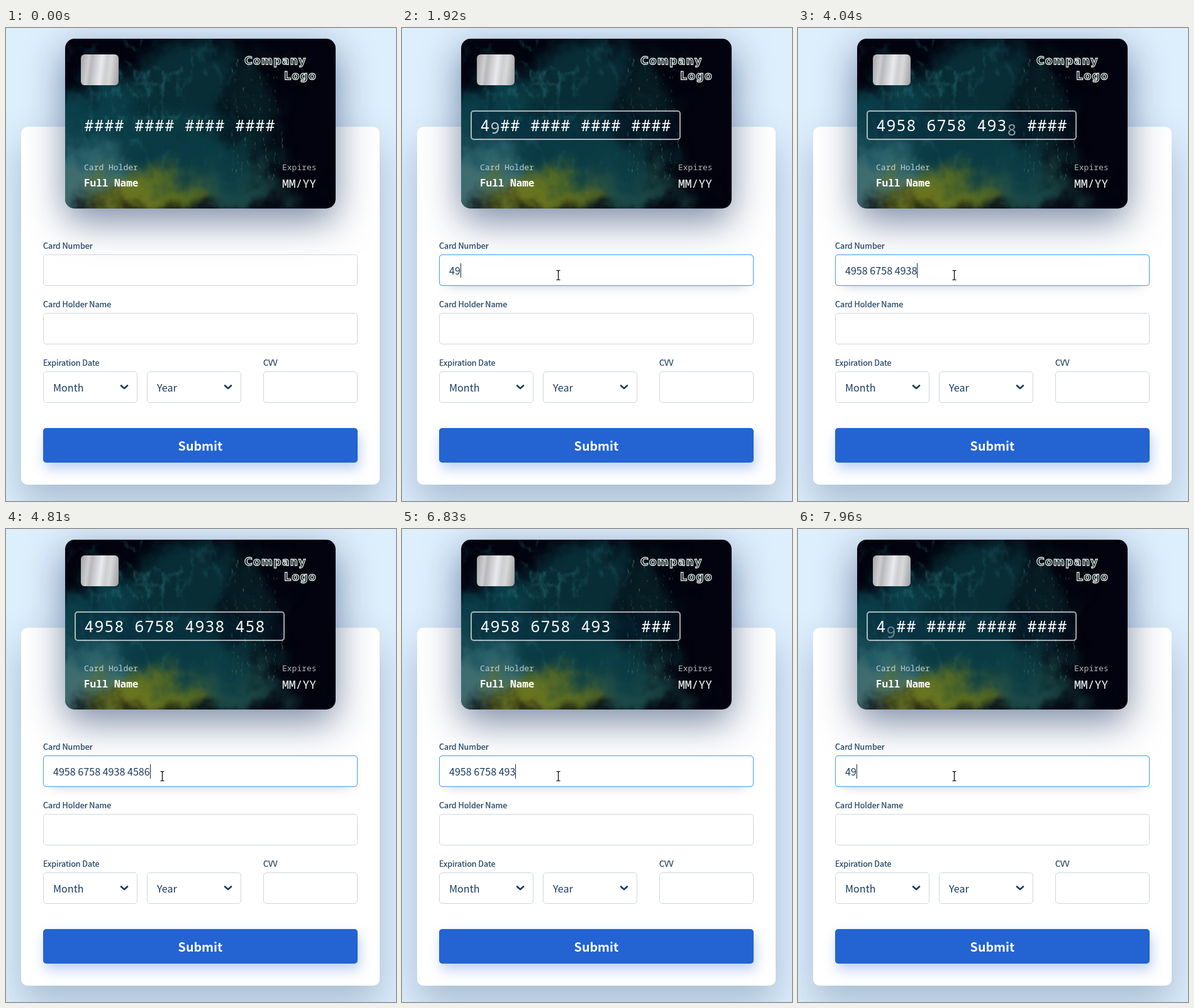
Animation of 620x752 px, one loop 8000 ms. Source, as an HTML page:

```html
<!DOCTYPE html>
<html lang="en">
<head>
<meta charset="utf-8">
<title>Card form</title>
<style>
  html, body { margin: 0; width: 100%; height: 100%; overflow: hidden; background: #ddeefc; }
  div, svg { position: absolute; box-sizing: border-box; }
  .form { left: 24px; top: 157px; width: 570px; height: 569px; border-radius: 10px; background: #fff;
    box-shadow: 0 30px 60px rgba(90, 116, 148, .4); }
  .card { left: 94px; top: 17px; width: 430px; height: 270px; border-radius: 15px; overflow: hidden;
    background: #02030e; will-change: transform; }
  .card-shadow { left: 94px; top: 17px; width: 430px; height: 270px; border-radius: 15px;
    box-shadow: 0 20px 60px rgba(14, 42, 90, .55); }
  .chip { left: 25px; top: 25px; width: 60px; height: 49px; border-radius: 6px;
    background: linear-gradient(97deg, #a3a3a5, #cfcfd1 20%, #b8b8ba 28%, #e9eaee 52%, #cdced0 65%, #d8d8d9 76%, #9b9c9d); }
  .field { width: 500px; height: 50px; left: 59px; border: 1px solid #ced6e0; border-radius: 5px; }
  .small { width: 150px; top: 546px; }
  .number { top: 360px; }
  #glow { border: 0; box-shadow: 0 10px 20px -13px rgba(32, 56, 117, .35); }
  #active { border-color: #3d9cff; }
  .submit { left: 59px; top: 636px; width: 500px; height: 55px; border-radius: 5px; background: #2364d2;
    box-shadow: 3px 10px 20px rgba(35, 100, 210, .3); }
  #frame { border: 2px solid rgba(255, 255, 255, .65); border-radius: 5px; background: rgba(8, 20, 47, .22); }
  text { font-family: "Noto Sans CJK JP", "Noto Sans CJK SC", "Noto Sans CJK", "Open Sans", sans-serif; fill: #1a3b5d; white-space: pre; }
  .label { font-size: 12.6px; font-weight: 500; stroke: #1a3b5d; stroke-width: .2px; }
  .value { font-size: 16.1px; font-weight: 300; }
  .action { font-size: 19.7px; font-weight: 700; fill: #fff; text-anchor: middle; }
  .mono, .digits text { font-family: "Noto Sans Mono", "DejaVu Sans Mono", monospace; fill: #fff; }
  .caption { font-size: 13px; opacity: .7; font-weight: 500; }
  .digits text { font-size: 24.8px; font-weight: 500; text-anchor: middle; }
  .logo { font: 700 17.5px "DejaVu Sans", sans-serif; letter-spacing: 1px; fill: #0b191e; stroke: #e3ece8; stroke-width: 1.3px; }
</style>
</head>
<body>
<div class="form"></div>
<div class="card-shadow"></div>
<div class="card">
  <svg width="430" height="270" viewBox="94 17 430 270">
    <defs>
      <filter id="smoke" x="-20%" y="-20%" width="140%" height="140%" color-interpolation-filters="sRGB">
        <feGaussianBlur stdDeviation="16" result="soft"/>
        <feTurbulence type="fractalNoise" baseFrequency=".018" numOctaves="4" seed="8"/>
        <feDisplacementMap in="soft" scale="85" xChannelSelector="R" yChannelSelector="G"/>
      </filter>
      <filter id="strands" x="-20%" y="-20%" width="140%" height="140%" color-interpolation-filters="sRGB">
        <feTurbulence type="fractalNoise" baseFrequency=".03" numOctaves="3" seed="4" result="noise"/>
        <feDisplacementMap in="SourceGraphic" in2="noise" scale="34" xChannelSelector="R" yChannelSelector="G"/>
        <feGaussianBlur stdDeviation="1"/>
      </filter>
      <filter id="wisps" x="0" y="0" width="100%" height="100%" color-interpolation-filters="sRGB">
        <feTurbulence type="turbulence" baseFrequency=".022 .014" numOctaves="4" seed="21"/>
        <feColorMatrix values="0 0 0 0 .2  0 0 0 0 .52  0 0 0 0 .54  0 0 0 -2.6 .55"/>
      </filter>
      <radialGradient id="fade" gradientUnits="userSpaceOnUse" cx="225" cy="100" r="185">
        <stop stop-color="#fff"/><stop offset=".5" stop-color="#888"/><stop offset="1" stop-color="#000"/>
      </radialGradient>
      <mask id="plume"><rect x="94" y="17" width="430" height="270" fill="url(#fade)"/></mask>
    </defs>
    <g filter="url(#smoke)">
      <ellipse cx="165" cy="145" rx="90" ry="70" fill="#0a3e49"/>
      <ellipse cx="285" cy="90" rx="72" ry="95" fill="#082d35"/>
      <ellipse cx="395" cy="145" rx="32" ry="120" fill="#071e25"/>
      <ellipse cx="250" cy="200" rx="150" ry="48" fill="#0a3b44"/>
      <ellipse cx="125" cy="215" rx="75" ry="35" fill="#28606a"/>
      <ellipse cx="120" cy="250" rx="70" ry="30" fill="#426f70"/>
      <ellipse cx="335" cy="258" rx="135" ry="28" fill="#1c4a48"/>
      <ellipse cx="230" cy="265" rx="85" ry="32" fill="#5b6d20"/>
      <ellipse cx="195" cy="278" rx="55" ry="16" fill="#7a8220"/>
    </g>
    <rect x="94" y="17" width="430" height="270" filter="url(#wisps)" mask="url(#plume)"/>
    <g id="strands" fill="none" stroke="#4a9895" filter="url(#strands)"></g>
    <g id="drops"></g>
  </svg>
  <div class="chip"></div>
</div>

<div class="field number" id="glow"></div>
<div class="field number"></div>
<div class="field number" id="active"></div>
<div class="field" style="top:453px"></div>
<div class="field small"></div>
<div class="field small" style="left:224px"></div>
<div class="field small" style="left:409px"></div>
<div class="submit"></div>
<div id="frame"></div>

<svg width="620" height="752">
  <text class="logo" x="379" y="58">Company</text>
  <text class="logo" x="442" y="82">Logo</text>
  <g class="digits" id="digits"></g>
  <text class="mono caption" x="124" y="226">Card Holder</text>
  <text class="mono" x="124" y="252" font-size="16" font-weight="600">Full Name</text>
  <text class="mono caption" x="439" y="226">Expires</text>
  <text class="mono" x="439" y="254" font-size="18" font-weight="500">MM/YY</text>
  <text class="label" x="59" y="351">Card Number</text>
  <text class="label" x="59" y="444">Card Holder Name</text>
  <text class="label" x="59" y="537">Expiration Date</text>
  <text class="label" x="409" y="537">CVV</text>
  <text class="value" x="75" y="578">Month</text>
  <text class="value" x="240" y="578">Year</text>
  <path d="M183 568.5l5 4.5 5-4.5M348 568.5l5 4.5 5-4.5" fill="none" stroke="#1a3b5d" stroke-width="2.6" stroke-linecap="round" stroke-linejoin="round"/>
  <text class="action" x="309" y="672">Submit</text>
  <text class="value" id="entry" x="75" y="392"></text>
  <rect id="caret" y="374" width="1" height="23" fill="#1a2b3d"/>
  <g id="pointer">
    <path id="beam" d="M-3-7.5H-1L0-6.5 1-7.5H3M0-6.5V6.5M-3 7.5H-1L0 6.5 1 7.5H3" fill="none" stroke="#000" stroke-width="1.2"/>
    <path id="arrow" d="M0 0V16L4 12.5 6.5 18 9 17 6.5 11.5H11.5Z" fill="#fff" stroke="#000"/>
  </g>
</svg>

<script>
const LOOP = 8000, BLINK = 530, SLIDE = 250, FOCUS = 840, HOVER = 340;
const NUMBER = "4958675849384586";
const $ = id => document.getElementById(id);
const clamp = v => Math.min(1, Math.max(0, v));
const mix = (a, b, p) => a + (b - a) * p;

// Timing function shaped like CSS cubic-bezier()
function bezier(x1, y1, x2, y2) {
  const at = (a, b, s) => 3 * (1 - s) ** 2 * s * a + 3 * (1 - s) * s * s * b + s ** 3;
  return x => {
    x = clamp(x);
    if (x === 0 || x === 1) return x;
    let low = 0, high = 1;
    for (let i = 0; i < 24; i++) {
      const mid = (low + high) / 2;
      if (at(x1, x2, mid) < x) low = mid; else high = mid;
    }
    return at(y1, y2, low);
  };
}
const easeInOut = bezier(.42, 0, .58, 1);
const focusEase = bezier(.71, .03, .56, .85);

function add(parent, tag, attributes) {
  const node = document.createElementNS("http://www.w3.org/2000/svg", tag);
  for (const name in attributes) node.setAttribute(name, attributes[name]);
  return parent.appendChild(node);
}

// Typing, single deletions, a held backspace, then typing again
const typed = [1560, 1760, 1960, 2160, 2400, 2695, 2937, 3179, 3421, 3663, 3905, 3920, 4130, 4360, 4580, 4810];
typed.splice(6, 6, 2937, 3179, 3370, 3550, 3730, 3910);
const removed = i => ({ 15: 5600, 14: 5770, 13: 6330, 12: 6820 })[i] ?? 6828 + (11 - i) * 45;
const slots = [...NUMBER].map((digit, i) => {
  const events = [{ time: -1000, char: "#" }, { time: typed[i], char: digit }, { time: removed(i), char: "#" }];
  if (i < 2) events.push({ time: 7690 + i * 160, char: digit });
  const x = 132 + 16 * (i + Math.floor(i / 4));
  return { events, node: add($("digits"), "text", { x, y: 164 }) };
});
const keyTimes = [FOCUS, ...slots.flatMap(slot => slot.events.map(e => e.time))];

// Fixed detail of the card picture
let seed = 7;
const random = () => (seed = seed * 16807 % 2147483647) / 2147483647;
for (let i = 0; i < 34; i++) {
  const x = 200 + random() * 130, y = 10 + random() * 55, sway = random() * 70 - 35;
  add($("strands"), "path", {
    d: `M${x} ${y}q${sway} 25 ${sway / 3} 50t${-sway / 2} ${25 + random() * 35}`,
    "stroke-width": .6 + random() * 2, opacity: .1 + random() * .3
  });
}
for (let i = 0; i < 170; i++) {
  const stream = Math.floor(random() * 8), y = 45 + random() * 195;
  add($("drops"), "rect", {
    x: 355 + stream * 11 + Math.sin(y / 25 + stream) * 5 + random() * 3, y,
    width: 1, height: 1 + random() * 5, fill: stream % 3 ? "#5d7050" : "#3b7774", opacity: .2 + random() * .5
  });
}

function drawNumber(t) {
  let entry = "";
  slots.forEach(({ events, node }, i) => {
    const event = events.filter(e => e.time <= t).pop();
    const p = easeInOut((t - event.time) / SLIDE);
    node.textContent = event.char;
    node.setAttribute("opacity", p);
    node.setAttribute("transform", `translate(0 ${15 * (1 - p)})`);
    if (event.char !== "#") entry += (i && i % 4 === 0 ? " " : "") + event.char;
  });
  $("entry").textContent = entry;
  const lastKey = Math.max(...keyTimes.filter(time => time <= t));
  const lit = t >= FOCUS && Math.floor((t - lastKey) / BLINK) % 2 === 0;
  const width = entry ? $("entry").getComputedTextLength() : 0;
  $("caret").setAttribute("x", Math.round(75 + width));
  $("caret").setAttribute("visibility", lit ? "visible" : "hidden");
}

function drawFocus(t) {
  const p = focusEase((t - FOCUS) / 350);
  const left = mix(94, 109, p), top = mix(17, 131, p);
  Object.assign($("frame").style, {
    left: left + "px", top: top + "px",
    width: mix(524, 443, p) - left + "px", height: mix(287, 178, p) - top + "px", opacity: p
  });
  $("glow").style.opacity = easeInOut((t - HOVER) / 300);
  $("active").style.opacity = easeInOut((t - FOCUS) / 300);
}

function drawPointer(t) {
  const p = 1 - (1 - clamp((t - 300) / 320)) ** 2;
  const x = mix(640, 248.5, p), y = mix(400, 393, p), inside = x < 559;
  $("pointer").setAttribute("transform", `translate(${x} ${y})`);
  $("beam").setAttribute("visibility", inside ? "visible" : "hidden");
  $("arrow").setAttribute("visibility", inside ? "hidden" : "visible");
}

const start = performance.now();
function draw(now) {
  const t = Math.max(0, now - start) % LOOP;
  drawNumber(t);
  drawFocus(t);
  drawPointer(t);
  requestAnimationFrame(draw);
}
draw(start);
</script>
</body>
</html>
```
